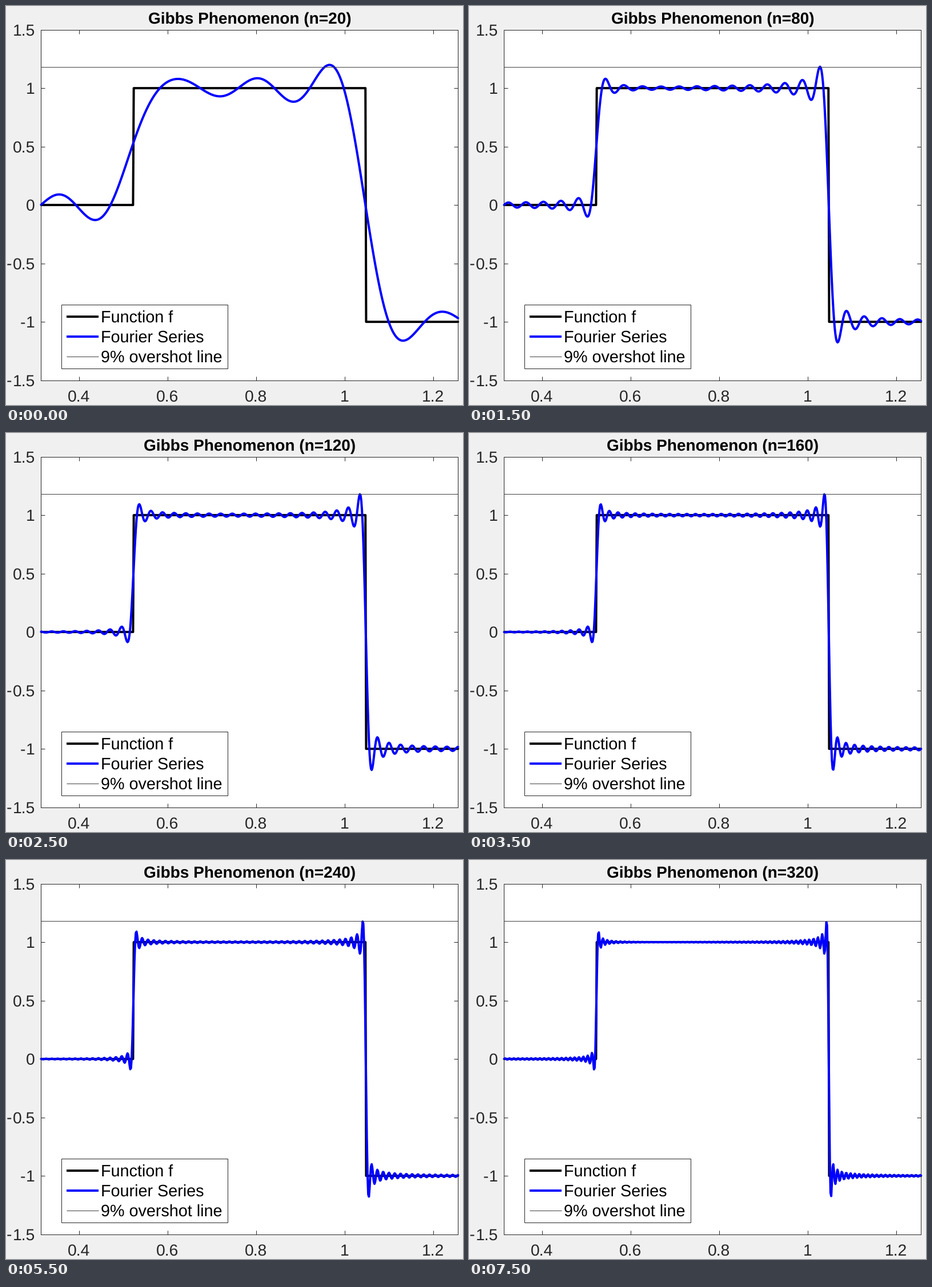
Animation of 800x700 px, one loop 8 s. Source, as a matplotlib script:

```python
import numpy as np
import matplotlib.pyplot as plt
from matplotlib.animation import FuncAnimation
from matplotlib.lines import Line2D
from matplotlib.patches import Rectangle

W, H, DPI = 800, 700, 100
LEFT, RIGHT, TOP, BOTTOM = 61.4, 791.45, 41.6, 656.6
PT = 72 / DPI
INK = "#262626"
THIN = "#404040"
BLUE = "#0000ff"

plt.rcParams.update({
    "font.family": "Liberation Sans",
    "text.hinting": "none",
    "path.simplify": False,
})

fig = plt.figure(figsize=(W / DPI, H / DPI), dpi=DPI, facecolor="#f0f0f0")
ax = fig.add_axes([LEFT / W, 1 - BOTTOM / H, (RIGHT - LEFT) / W, (BOTTOM - TOP) / H])
ax.set_xlim(np.pi / 10, 2 * np.pi / 5)
ax.set_ylim(-1.5, 1.5)
x_ticks = [0.4, 0.6, 0.8, 1, 1.2]
y_ticks = [-1.5, -1, -0.5, 0, 0.5, 1, 1.5]
ax.set_xticks(x_ticks)
ax.set_yticks(y_ticks)
ax.tick_params(direction="in", top=True, right=True, length=7 * PT, width=PT,
               color=INK, labelbottom=False, labelleft=False)
for spine in ax.spines.values():
    spine.set(linewidth=PT, edgecolor=INK)


def label(x, y, text, size=28, ha="left", color=INK, **style):
    """Text with its baseline at pixel (x, y), measured from the top left."""
    return fig.text(x / W, 1 - y / H, text, fontsize=size * PT, ha=ha,
                    va="baseline", color=color, **style)


def stroke(x, y, color, width):
    return ax.plot(x, y, color=color, lw=width * PT, clip_on=False, zorder=3,
                   solid_capstyle="round", solid_joinstyle="round")[0]


# Tick labels
for tick in x_ticks:
    px = LEFT + (tick - np.pi / 10) / (0.3 * np.pi) * (RIGHT - LEFT)
    label(px, 694, f"{tick:g}", 28.3, "center")
for tick in y_ticks:
    py = 349 - 205 * tick
    text = f"{abs(tick):g}"
    label(51, py + 10, text, 28.3, "right")
    if tick < 0:
        label(10.5 if "." in text else 34.5, py + 10, "-", 28.3, "right")

# Step function sampled on [0, pi/2]; sine coefficients by numerical quadrature
grid = np.linspace(0, np.pi / 2, 1000)
eps = 1e-9
step = np.select([grid < np.pi / 6 - eps, grid <= np.pi / 3 + eps], [0, 1], -1)
k = np.arange(1, 321)
sines = np.sin(2 * np.outer(k, grid))
coef = 4 / np.pi * np.trapezoid(step * sines, grid, axis=1) \
    if hasattr(np, "trapezoid") else 4 / np.pi * (sines @ step) * grid[1]

view = (grid >= np.pi / 10) & (grid <= 2 * np.pi / 5)
x = grid[view]
partial_sums = np.cumsum(coef[:, None] * sines[:, view], axis=0)

stroke(x, step[view], "black", 4)
series = stroke(x, partial_sums[19], BLUE, 4)
ax.plot([np.pi / 10, 2 * np.pi / 5], [1.18, 1.18], color=THIN, lw=PT, zorder=4)

# Legend
pixels = dict(transform=fig.transFigure, figure=fig)
fig.add_artist(Rectangle((97.2 / W, 1 - 635.5 / H), 291 / W, 112 / H, fc="white",
                         ec=INK, lw=PT, zorder=6, **pixels))
entries = [("Function f", "black", 4), ("Fourier Series", BLUE, 4),
           ("9% overshot line", THIN, 1)]
for row, (name, color, width) in enumerate(entries):
    y = 545 + 35 * row
    fig.add_artist(Line2D([105.5 / W, 161.5 / W], [1 - y / H] * 2, color=color,
                          lw=width * PT, solid_capstyle="butt", zorder=7, **pixels))
    label(166, y + 10, name, 28.8, color="black", zorder=7)

title = label((LEFT + RIGHT) / 2, 31, "", 28, "center", "black", weight="bold")


def update(frame):
    n = 20 * (frame + 1)
    series.set_ydata(partial_sums[n - 1])
    title.set_text(f"Gibbs Phenomenon (n={n})")
    return series, title


anim = FuncAnimation(fig, update, frames=16, interval=500, repeat=True,
                     repeat_delay=0, blit=False)
plt.show()
```
